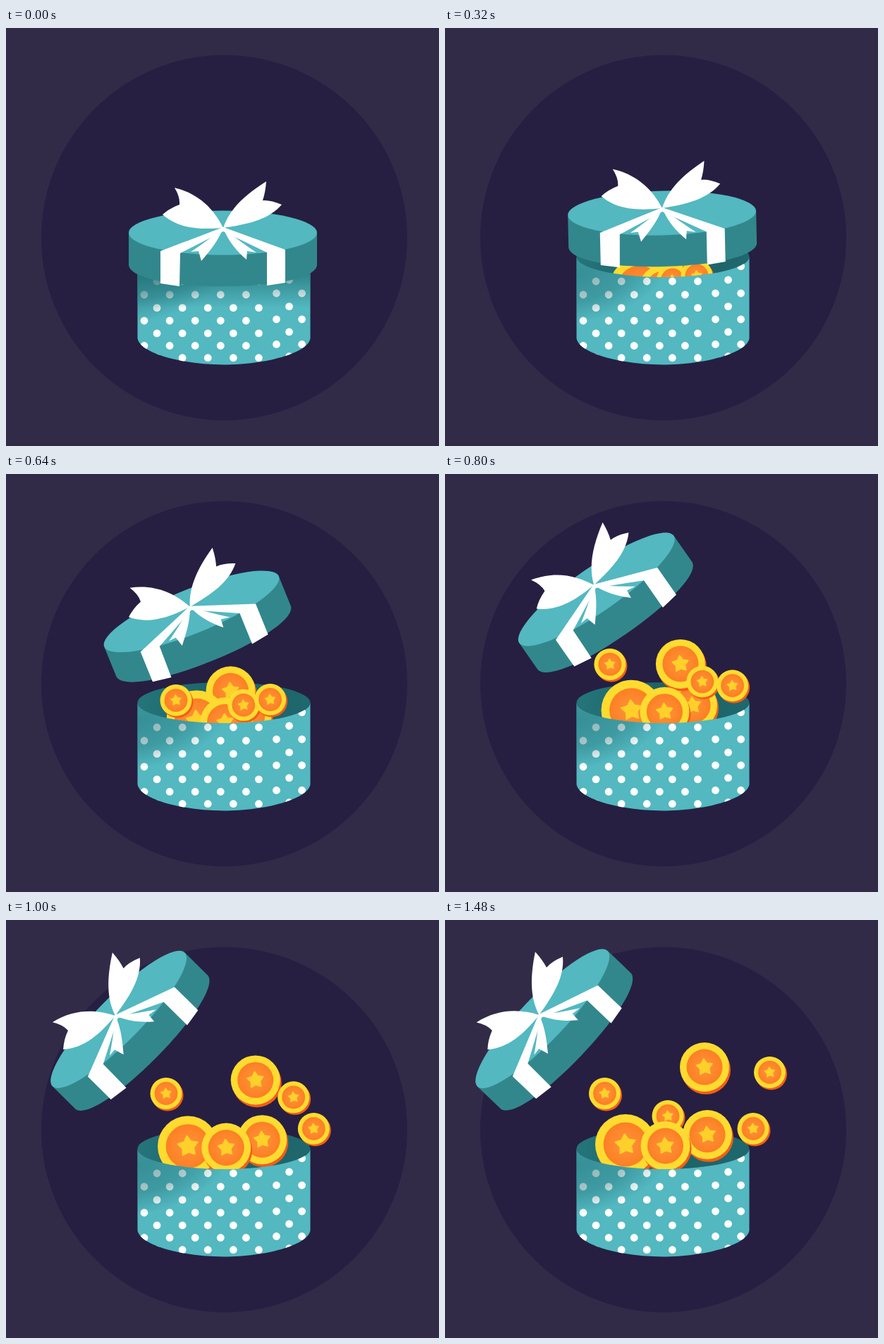
These frames come from a looping animation (614 px wide and 594 px high, 2.2 s). An HTML page:

```html
<!DOCTYPE html>
<html lang="en">
<head>
<meta charset="utf-8">
<title>Gift box</title>
<style>
html, body { margin: 0; width: 100%; height: 100%; overflow: hidden; background: #312b48; }
svg { display: block; width: 100vw; height: 100vh; }
</style>
</head>
<body>
<svg viewBox="0 0 614 594">
  <defs>
    <radialGradient id="core" cx=".5" cy=".5" r=".55">
      <stop offset="0" stop-color="#ff943a"/>
      <stop offset="1" stop-color="#fc7d22"/>
    </radialGradient>
    <radialGradient id="shade" gradientUnits="userSpaceOnUse" cx="0" cy="0" r="1"
      gradientTransform="translate(190 350) rotate(-12) scale(130 68)">
      <stop offset="0" stop-color="#1d6a70" stop-opacity=".52"/>
      <stop offset=".55" stop-color="#1d6a70" stop-opacity=".38"/>
      <stop offset="1" stop-color="#1d6a70" stop-opacity="0"/>
    </radialGradient>
    <linearGradient id="cast" gradientUnits="userSpaceOnUse" x1="0" y1="350" x2="0" y2="398">
      <stop offset="0" stop-color="#1d6a70" stop-opacity=".65"/>
      <stop offset="1" stop-color="#1d6a70" stop-opacity="0"/>
    </linearGradient>
    <linearGradient id="inside" x1="0" x2="1">
      <stop offset="0" stop-color="#24757a"/>
      <stop offset=".5" stop-color="#1d6267"/>
      <stop offset="1" stop-color="#1f686d"/>
    </linearGradient>
    <path id="front" d="M186.500 325A122.500 29 0 0 0 431.500 325V441C428.500 462 368 478.500 309 478.500S189.500 462 186.500 441Z"/>
    <clipPath id="frontClip"><use href="#front"/></clipPath>
  </defs>

  <rect width="614" height="594" fill="#312b48"/>
  <circle cx="309.500" cy="298" r="259.500" fill="#261f42"/>

  <ellipse cx="309" cy="325" rx="122.500" ry="29" fill="url(#inside)"/>
  <g id="coins"></g>

  <use href="#front" fill="#53b8c0"/>
  <g clip-path="url(#frontClip)">
    <g id="dots" fill="#fff"></g>
    <rect x="180" y="290" width="260" height="190" fill="url(#shade)"/>
    <rect id="castShade" x="180" y="290" width="260" height="190" fill="url(#cast)"/>
  </g>

  <!-- lid, with the knot at 0,0 -->
  <g id="lid">
    <path fill="#32878d" d="M-134 8V53C-132 71-75 83-.5 83S131 71 133 53V8Z"/>
    <ellipse cx="-.5" cy="7" rx="133.500" ry="31.500" fill="#53b8c0"/>
    <g fill="#fff">
      <path d="M0-1L-89 33V79L-62 83L-61 36L0 5L62 35V82L88 78V31Z"/>
      <path d="M0 0C-16 13-32 25-46 34L-35 33L-31 47C-20 34-7 19 0 0Z"/>
      <path d="M0 0C16 13 32 25 47 35L34 33L33 45C20 34 7 19 0 0Z"/>
      <path d="M0 0C-12-24-32-48-69-57Q-61-44-62-33Q-76-28-86-19C-64 1-34 3 0 0Z"/>
      <path d="M0 0C9-27 31-47 61-66Q60-51 56-39Q67-40 83-33C64-11 34-5 0 0Z"/>
    </g>
  </g>
</svg>

<script>
const LOOP = 2200, STEP = 40;
const $ = id => document.getElementById(id);

function add(parent, tag, attrs) {
  const el = document.createElementNS('http://www.w3.org/2000/svg', tag);
  for (const k in attrs) el.setAttribute(k, attrs[k]);
  return parent.appendChild(el);
}

// Smooth 0..1 progress
function ease(t, start, dur) {
  const u = Math.min(1, Math.max(0, (t - start) / dur));
  return u * u * (3 - 2 * u);
}
const mix = (a, b, k) => a + (b - a) * k;

// Back to front; the sideways drift lags behind the rise
const coins = [
  { r: 22.5, from: [314, 350], to: [316, 278.5], start: 660, dur: 700, lag: 0 },
  { r: 35, from: [334, 362], to: [372, 305], start: 300, dur: 900, lag: 80 },
  { r: 35, from: [306, 355], to: [368, 209], start: 300, dur: 900, lag: 80 },
  { r: 43, from: [276, 369], to: [256, 319], start: 310, dur: 800, lag: 50 },
  { r: 35, from: [310, 371], to: [312.5, 321], start: 310, dur: 800, lag: 50 },
  { r: 22.5, from: [245, 383], to: [226.5, 246.5], start: 360, dur: 600, lag: 100 },
  { r: 22.5, from: [322.5, 358], to: [460.5, 216.5], start: 360, dur: 950, lag: 90 },
  { r: 22.5, from: [357, 352], to: [437, 296.5], start: 335, dur: 560, lag: 135 }
];

function makeCoin(r) {
  const g = add($('coins'), 'g', {});
  add(g, 'circle', { cx: 2, cy: r * .11, r, fill: '#f45c18' });
  add(g, 'circle', { r, fill: '#ffdb30' });
  add(g, 'circle', { r: r * .73, fill: 'url(#core)' });
  const pts = Array.from({ length: 10 }, (_, i) => {
    const a = i * Math.PI / 5 - Math.PI / 2 - .1, q = r * (i % 2 ? .19 : .34);
    return (q * Math.cos(a)).toFixed(2) + ',' + (q * Math.sin(a)).toFixed(2);
  });
  add(g, 'polygon', {
    points: pts.join(' '), fill: '#ffd02a', stroke: '#ffd02a',
    'stroke-width': r * .05, 'stroke-linejoin': 'round'
  });
  return g;
}

// Staggered rows that close up downwards, with a wider gap before the last three columns
function makeDots() {
  for (let row = -1; row < 7; row++)
    for (let col = 0; col < 13; col++) {
      if ((row + col) % 2 === 0 || (row < 0 && col < 12)) continue;
      const right = col > 9;
      add($('dots'), 'circle', {
        cx: 196 + 18.05 * col + (right ? 7 : 0),
        cy: 360 + 19.2 * row - .18 * row * row - (right ? 2 : 0),
        r: 5.4
      });
    }
}

function place(el, x, y, turn = 0) {
  el.setAttribute('transform', `translate(${x} ${y}) rotate(${turn})`);
}

function draw(now) {
  const t = Math.floor(now % LOOP / STEP) * STEP;
  place($('lid'),
    mix(308, 133.5, ease(t, 360, 820)),
    mix(284, 135, ease(t, 40, 1010)),
    mix(0, -46.3, ease(t, 237, 833)));
  $('castShade').setAttribute('opacity', 1 - ease(t, 40, 280));
  for (const { el, from, to, start, dur, lag } of coins)
    place(el,
      mix(from[0], to[0], ease(t, start + lag, dur)),
      mix(from[1], to[1], ease(t, start, dur)));
}

for (const c of coins) c.el = makeCoin(c.r);
makeDots();
const begin = performance.now();
function tick() {
  draw(performance.now() - begin);
  requestAnimationFrame(tick);
}
tick();
</script>
</body>
</html>
```
